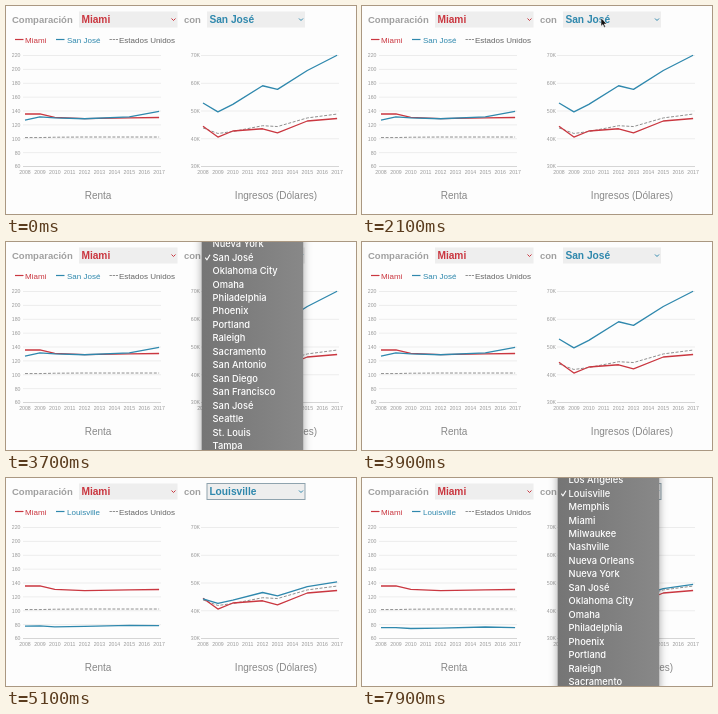
An HTML page for the animation above (8000 ms loop, 350 by 208 pixels).

```html
<!DOCTYPE html>
<html lang="es">
<meta charset="utf-8">
<title>Comparación</title>
<style>
html, body { margin: 0; width: 100%; height: 100%; overflow: hidden; background: #fdfdfd }
svg { display: block; width: 350px; height: 208px; font-family: "Liberation Sans", Arial, sans-serif }
.head { font-weight: bold; font-size: 9.5px; fill: #a0a0a0 }
.title { font-size: 10px; fill: #888; text-anchor: middle }
.pick { font-weight: bold; font-size: 10.2px }
.legend { font-size: 8px; fill: #666 }
.tick { font-size: 5.2px; fill: #999 }
.menu { font: 500 9.3px Inter, sans-serif; fill: #fff }
.panel { fill: url(#shade); filter: drop-shadow(0 2px 4px rgba(0, 0, 0, .35)) }
polyline { fill: none; stroke-linejoin: round }
</style>
<svg id="stage" viewBox="0 0 350 208">
  <linearGradient id="shade"><stop stop-color="#757575"/><stop offset="1" stop-color="#888"/></linearGradient>
</svg>
<script>
const RED = '#ca3740', BLUE = '#2f88ad', GRAY = '#909090', LOOP = 8000;
const stage = document.getElementById('stage');

function add(tag, attrs, parent = stage) {
  const el = document.createElementNS('http://www.w3.org/2000/svg', tag);
  for (const k in attrs) el.setAttribute(k, attrs[k]);
  return parent.appendChild(el);
}
function text(str, x, y, cls, attrs = {}, parent) {
  const el = add('text', { x, y, class: cls, ...attrs }, parent);
  el.textContent = str;
  return el;
}
const hline = (x1, x2, y, attrs) => add('line', { x1, x2, y1: y, y2: y, ...attrs });
const mix = (a, b, p) => a + (b - a) * p;

// Eased progress from 0 to 1, starting at the given time
function progress(t, start, duration) {
  const p = Math.max(0, Math.min(1, (t - start) / duration));
  return p < .5 ? 4 * p ** 3 : 1 - 4 * (1 - p) ** 3;
}

function select(x, width, color, name) {
  const box = add('rect', { x, y: 5.5, width, height: 16, fill: '#eee' });
  const label = text(name, x + 2.4, 17, 'pick', { fill: color });
  add('polyline', { points: `${x + width - 6},12.5 ${x + width - 4},14.5 ${x + width - 2},12.5`, stroke: color });
  return { box, label };
}
function legend(name, x, textX, color, line) {
  hline(x, x + 8.5, 33.5, { stroke: color, ...line });
  return text(name, textX, 36.5, 'legend', color == GRAY ? {} : { style: `fill:${color}` });
}

text('Comparación', 6, 17, 'head');
text('con', 178, 17, 'head');
select(73, 98.5, RED, 'Miami');
const picker = select(201, 98, BLUE, 'San José');
legend('Miami', 9, 19, RED, { 'stroke-width': 1.2 });
const legendName = legend('San José', 50, 61, BLUE, { 'stroke-width': 1.2 });
legend('Estados Unidos', 103.5, 113, GRAY, { 'stroke-dasharray': '2.4 .8' });

// Values are given at a few years after 2008 and run straight between them
const TOP = 49.5, HEIGHT = 111, STEP = 14.9;
const charts = [
  {
    x: 19, labelX: 14.5, title: 'Renta', titleX: 92, max: 220, min: 60, gap: 20, unit: '',
    years: [0, 1, 2, 4, 7, 9],
    usa: [101.7, 101.7, 102.2, 102.5, 102.5, 102.5],
    miami: [135.7, 135.7, 130.9, 129, 130, 130.6],
    sanJose: [127, 131.4, 130, 128.8, 131.4, 139.3],
    louisville: [75.7, 75.7, 74.4, 75, 76.6, 75.8]
  },
  {
    x: 197, labelX: 194, title: 'Ingresos (Dólares)', titleX: 270, max: 70, min: 30, gap: 10, unit: 'K',
    years: [0, 1, 2, 4, 5, 7, 9],
    usa: [43.9, 41.9, 42.6, 44.7, 44.4, 47.5, 48.9],
    miami: [44.5, 40.6, 42.8, 43.6, 42.1, 46.4, 47.3],
    sanJose: [52.9, 49.7, 52.4, 59.1, 57.8, 64.6, 70.1],
    louisville: [43.9, 42.3, 43.4, 46, 44.8, 48, 49.5]
  }
];
const yOf = (c, v) => TOP + HEIGHT * (c.max - v) / (c.max - c.min);
const points = (c, values) => values.map((v, i) => `${c.x + c.years[i] * STEP},${yOf(c, v)}`).join(' ');

for (const c of charts) {
  for (let v = c.max; v >= c.min; v -= c.gap) {
    const y = yOf(c, v);
    hline(c.x - 2, c.x + 136, y, { stroke: v == c.min ? '#c4c4c4' : '#e6e6e6', 'stroke-width': .7 });
    text(v + c.unit, c.labelX, y + 1.9, 'tick', { 'text-anchor': 'end' });
  }
  for (let i = 0; i < 10; i++)
    text(2008 + i, c.x + i * STEP, 168, 'tick', { 'text-anchor': 'middle' });
  text(c.title, c.titleX, 193.3, 'title');
  add('polyline', { points: points(c, c.usa), stroke: GRAY, 'stroke-dasharray': '3 1.6' });
  add('polyline', { points: points(c, c.miami), stroke: RED, 'stroke-width': 1.3 });
  c.line = add('polyline', { stroke: BLUE, 'stroke-width': 1.3 });
}

// Open list, shifted so that the checked city lies over the select box
const ROW = 13.46, FIRST = 8.5;
const cities = ['Los Angeles', 'Louisville', 'Memphis', 'Miami', 'Milwaukee', 'Nashville', 'Nueva Orleans',
  'Nueva York', 'San José', 'Oklahoma City', 'Omaha', 'Philadelphia', 'Phoenix', 'Portland', 'Raleigh',
  'Sacramento', 'San Antonio', 'San Diego', 'San Francisco', 'San José', 'Seattle', 'St. Louis', 'Tampa'];
const menu = add('g', {});
add('rect', { x: 195.7, y: -20, width: 101.5, height: 250, class: 'panel' }, menu);
const hover = add('rect', { x: 195.7, width: 101.5, height: ROW, fill: '#a6a6a6' }, menu);
const list = add('g', {}, menu);
cities.forEach((city, i) => text(city, 206.6, 18.6 + i * ROW, 'menu', {}, list));
add('polyline', { points: '199.3,15.6 201,17.8 204,12.8', stroke: '#fff', 'stroke-width': 1.1 }, menu);

const cursor = add('path', {
  d: 'M0 0V8.2L1.9 6.5 3.2 9.4 4.5 8.8 3.2 6H5.8Z', fill: '#111', stroke: '#fff', 'stroke-width': .5
});

// Each visit: the pointer comes from above, opens the list and leaves upwards
const visits = [
  { x: 239, come: 1840, open: 2200, go: 2770, close: 3850 },
  { x: 281, come: 6600, open: 7100, go: 7300, close: LOOP }
];

function draw(now) {
  const t = now % LOOP;
  const chosen = t >= 3950;
  const name = chosen ? 'Louisville' : 'San José';
  picker.label.textContent = legendName.textContent = name;
  picker.box.setAttribute('stroke', chosen ? '#8fa3ae' : 'none');

  const p = progress(t, 3950, 1480);
  for (const c of charts)
    c.line.setAttribute('points', points(c, c.sanJose.map((v, i) => mix(v, c.louisville[i], p))));

  const visit = visits.find(v => t < v.close);
  const left = progress(t, visit.go, 250);
  const x = visit.x + 18 * left;
  const y = mix(-14, 12, progress(t, visit.come, 260) - left);
  cursor.setAttribute('transform', `translate(${x} ${y})`);

  menu.setAttribute('visibility', t >= visit.open ? 'visible' : 'hidden');
  list.setAttribute('transform', `translate(0 ${-ROW * cities.indexOf(name)})`);
  hover.setAttribute('y', FIRST + ROW * Math.floor((y - FIRST) / ROW));
}

function tick() {
  draw(performance.now());
  requestAnimationFrame(tick);
}
tick();
</script>
</html>
```
